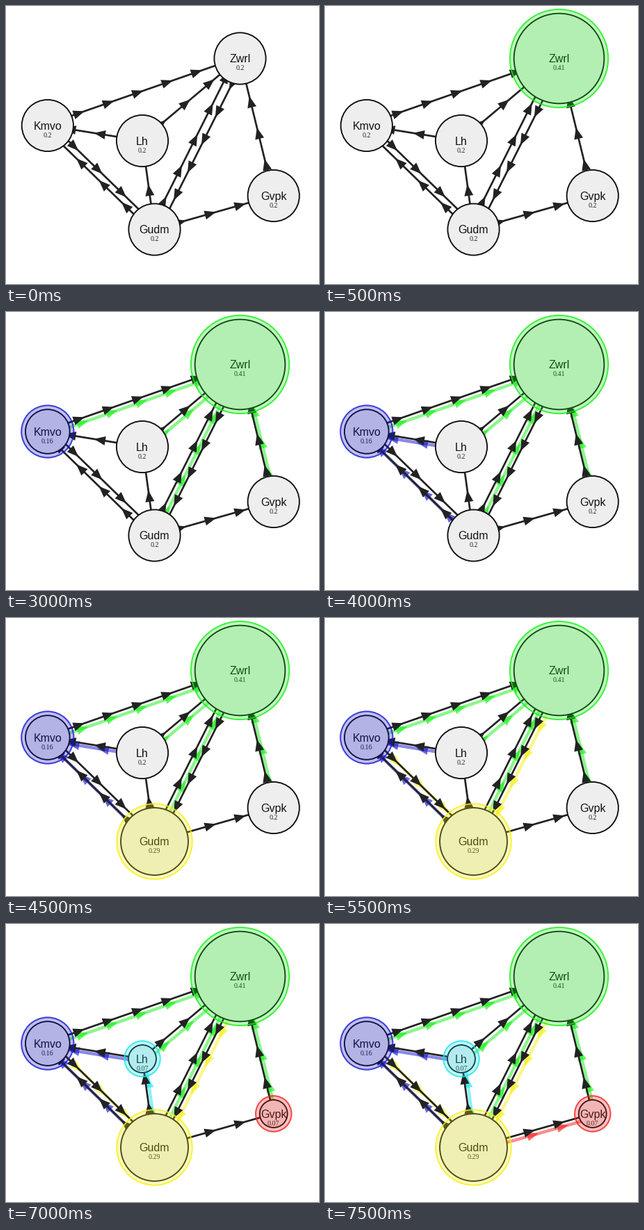
Animation, 450 px wide and 400 px high, one loop 8 s. Source, as a matplotlib script:

```python
import numpy as np
import matplotlib.pyplot as plt
from matplotlib.animation import FuncAnimation
from matplotlib.patches import Circle, Polygon

W, H, DPI = 450, 400, 100
PX = 72 / DPI
INK = "#222222"
START = 0.2
SHIFT = np.array([5, 5])

# name: (x, y), final rank, highlight colour
NODES = {
    "Zwrl": ((336.5, 75.5), 0.41, "#14f014"),
    "Kmvo": ((59.8, 172), 0.16, "#1414d2"),
    "Lh": ((196, 194), 0.07, "#14e6f0"),
    "Gudm": ((213.5, 321.5), 0.286, "#f5f014"),
    "Gvpk": ((384.7, 273), 0.07, "#fa1e1e"),
}

# (from, to): sideways offset, first arrow, arrow spacing
EDGES = {
    ("Kmvo", "Zwrl"): (2, 47.6, 44.8),
    ("Gvpk", "Zwrl"): (0, 45, 46.5),
    ("Lh", "Zwrl"): (1, 36, 45.5),
    ("Gudm", "Zwrl"): (6, 40.6, 50),
    ("Lh", "Kmvo"): (0, 61, 43),
    ("Gudm", "Kmvo"): (5, 52, 45.2),
    ("Zwrl", "Gudm"): (6, 37.8, 44.5),
    ("Kmvo", "Gudm"): (5, 47.5, 48),
    ("Gudm", "Lh"): (0, 56, 43),
    ("Gudm", "Gvpk"): (0, 38, 44.5),
}

# Each step ranks a node or lights one of its incoming edges.
STEPS = [None]
for name in ("Zwrl", "Kmvo", "Gudm", "Lh", "Gvpk"):
    STEPS.append(name)
    STEPS += [edge for edge in EDGES if edge[1] == name]

fig = plt.figure(figsize=(W / DPI, H / DPI), dpi=DPI, facecolor="white")
ax = fig.add_axes([0, 0, 1, 1])


def radius(rank):
    return 10.7 + 132 * rank


def draw_edge(edge, color, width, z, shift=(0, 0), alpha=1, tip_alpha=1):
    side, first, gap = EDGES[edge]
    a, b = (np.array(NODES[n][0]) for n in edge)
    length = np.hypot(*(b - a))
    u = (b - a) / length
    left = np.array([u[1], -u[0]])
    a = a + side * left + shift
    end = a + u * length
    ax.plot([a[0], end[0]], [a[1], end[1]], color=color, lw=width * PX,
            alpha=alpha, zorder=z, solid_capstyle="butt")
    for d in np.arange(first, length - 12, gap):
        p = a + u * d
        tri = [p + 9.5 * u, p - 7 * u + 6.5 * left, p - 7 * u - 6.5 * left]
        ax.add_patch(Polygon(tri, fc=color, lw=0, alpha=tip_alpha, zorder=z))


def draw_node(name, ranked):
    (x, y), rank, color = NODES[name]
    value = rank if ranked else START
    r = radius(value)
    ax.add_patch(Circle((x, y), r, fc="#eeeeee", ec="#111111",
                        lw=1.9 * PX, zorder=3))
    ax.text(x, y + 5.5, name, family="Liberation Sans", size=16 * PX,
            color="#111111", ha="center", va="baseline", zorder=4)
    ax.text(x, y + 17, f"{value:.2g}", family="Liberation Serif", size=10 * PX,
            color="#222222", ha="center", va="baseline", zorder=4)
    if ranked:
        halo = r + 5.8
        ax.add_patch(Circle((x, y), halo, fc=color, lw=0, alpha=0.27, zorder=5))
        ax.add_patch(Circle((x, y), halo, fill=False, ec=color,
                            lw=2 * PX, alpha=0.8, zorder=6))


def draw(i):
    ax.clear()
    ax.set_xlim(0, W)
    ax.set_ylim(H, 0)
    ax.axis("off")
    done = STEPS[:i + 1]
    for edge in EDGES:
        if edge in done:
            draw_edge(edge, NODES[edge[1]][2], 4.5, 1, SHIFT, 0.5, 0.65)
        draw_edge(edge, INK, 2.7, 2)
    for name in NODES:
        draw_node(name, name in done)
    return []


anim = FuncAnimation(fig, draw, frames=len(STEPS), interval=500,
                     repeat=True, repeat_delay=0)
plt.show()
```
